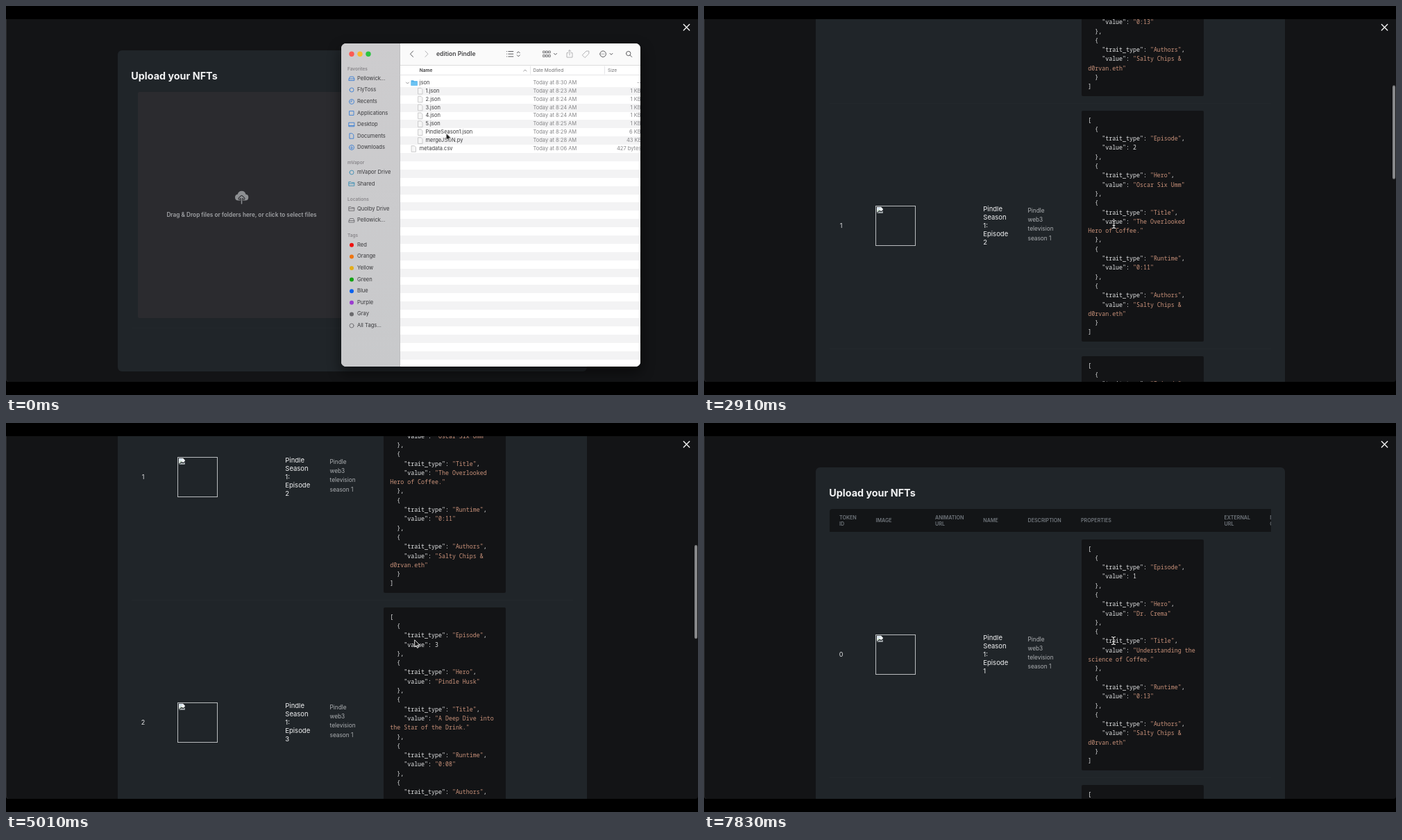
Write an HTML page that moves like this. It is 997 by 561 pixels and loops after 8 s.

```html
<!DOCTYPE html>
<html lang="en">
<head>
<meta charset="utf-8">
<title>Upload your NFTs</title>
<style>
@property --s { syntax: "<number>"; inherits: true; initial-value: 0; }
html, body { margin: 0; width: 100%; height: 100%; overflow: hidden; background: #000; }
#stage { position: relative; width: 997px; height: 561px; overflow: hidden; background: #000;
  font-family: Inter, Roboto, sans-serif; animation: scroll 8s linear infinite; }
#stage div, #stage svg { position: absolute; box-sizing: border-box; }
svg { left: 0; top: 0; overflow: visible; fill: none; stroke-linecap: round; stroke-linejoin: round; }
.t { white-space: pre; line-height: 12px; }

#view { left: 0; top: 19px; width: 997px; height: 523px; overflow: hidden; background: #131416;
  border-radius: 0 0 4px 4px; box-shadow: inset 1px 0 #2a2b2d; }
.layer { left: 0; top: 0; width: 997px; height: 561px; }
#page { top: -19px; transform: translateY(calc(var(--s) * -1px)); }
.panel { left: 160.5px; width: 676px; top: 64px; background: #202529; border-radius: 6px; }
#drop { animation: drop 8s step-end infinite; }
#table { animation: table 8s step-end infinite; }
#bar { left: 991.5px; top: 0; width: 4.5px; height: 135px; border-radius: 3px; background: #88898b;
  transform: translateY(calc(var(--s) * .2575px)); animation: bar 8s linear infinite; }
.title { font-size: 14.35px; font-weight: 700; color: #f2f3f4; }
.line { left: 181px; width: 636px; height: 1px; background: #23282c; }
.zone { left: 190px; top: 124px; width: 299px; height: 326px; background: #2b2b2f; border-radius: 2px; }
.hint { left: 190px; width: 299px; text-align: center; font-size: 8.25px; font-weight: 600; color: #a0a2a5; }
.head { left: 180.5px; top: 124px; width: 636px; height: 32.5px; border-radius: 4px 0 0 0; background: #131517; overflow: hidden; }
.th { font-size: 7.15px; font-weight: 600; line-height: 9.6px; color: #70767c; }
.id { width: 30px; text-align: center; font-size: 9px; color: #e6e7e8; }
.name { font-size: 9.5px; line-height: 11.86px; color: #f0f1f2; }
.desc { font-size: 8.3px; line-height: 13.3px; color: #adb0b3; }
.img { left: 247.3px; width: 57.5px; height: 57.5px; border: 1px solid #b9bcbe; }
.code { left: 544px; width: 176px; height: 333px; padding: 7px 9.3px; background: #131416; border-radius: 2px;
  font: 500 8.3px/13.3px "Noto Sans Mono", "DejaVu Sans Mono", monospace; white-space: pre; color: #e2e3e4; }
.code i { font-style: normal; color: #ca927a; }
.btn { top: 1950.5px; height: 24px; border-radius: 3.5px; background: #2f3337; text-align: center;
  font-size: 9.4px; font-weight: 600; line-height: 24px; color: #f4f5f6; }
.pg { font-size: 8.7px; color: #d8dadb; }

#finder { left: 483px; top: 54px; width: 431px; height: 466px; border-radius: 7px; overflow: hidden; background: #fff; }
#win { left: 0; top: 0; width: 997px; height: 561px; animation: win 8s step-end infinite; }
#shade { left: 483px; top: 54px; width: 431px; height: 466px; border-radius: 7px; box-shadow: 0 8px 18px 2px rgba(0,0,0,.45); }
#fin { left: -483px; top: -54px; width: 997px; height: 561px; }
.side { left: 483px; top: 54px; width: 85px; height: 466px; background: linear-gradient(#cdccce, #c8c9cb); border-right: 1px solid #bdbdbf; }
.tool { left: 568px; top: 54px; width: 346px; height: 31.5px; background: #fafafa; border-bottom: 1px solid #dcdcdc; }
.rows { left: 568px; top: 104.8px; width: 346px; height: 416px;
  background: repeating-linear-gradient(#fff 0 11.9px, #f3f3f4 11.9px 23.8px); }
.wt { font-size: 8.65px; font-weight: 600; color: #454547; }
.col { font-size: 6.6px; color: #707072; }
.colb { font-size: 6.6px; font-weight: 600; color: #3a3a3c; }
.grp { font-size: 6.5px; font-weight: 600; color: #88868a; }
.item { font-size: 7.6px; color: #39393c; }
.file { font-size: 7.5px; color: #3b3b3d; }
.meta { font-size: 7.5px; color: #858587; }
.sel { left: 572px; top: 176.6px; width: 350px; height: 11.4px; border-radius: 3px; background: #0a5fd6; }
.pick { left: 0; top: 0; animation: pick 8s step-end infinite; }
.pick .t { color: #fff; }

#cur { left: 0; top: 0; animation: move 8s linear infinite; }
#ghost { left: 0; top: 0; animation: ghost 8s step-end infinite; }
#ghost .t { color: #d9dadb; }
#arrow { animation: arrow 8s step-end infinite; }
#beam { animation: beam 8s step-end infinite; }

/* Two flicks of the wheel, each with a brief hold between push and glide */
@keyframes scroll {
  0% { --s: 0 }
  33% { --s: 0; animation-timing-function: cubic-bezier(.4,.1,.7,.4) }
  36.35% { --s: 371 }
  36.65% { --s: 371; animation-timing-function: cubic-bezier(.3,.42,.6,1) }
  43.5% { --s: 1508 }
  60.45% { --s: 1508; animation-timing-function: cubic-bezier(.4,.2,.7,.7) }
  62.6% { --s: 610 }
  62.9% { --s: 610; animation-timing-function: cubic-bezier(.2,.46,.5,1) }
  65.9%, 100% { --s: 0 }
}
@keyframes bar {
  0%, 32.9%, 48%, 60.4%, 70.1%, 100% { opacity: 0 }
  33.1%, 45%, 60.6%, 67% { opacity: 1 }
}
@keyframes drop { 0% { opacity: 1 } 16.5%, 100% { opacity: 0 } }
@keyframes table { 0% { opacity: 0 } 16.5%, 100% { opacity: 1 } }
@keyframes win { 0% { opacity: 1 } 17.625%, 100% { opacity: 0 } }
@keyframes pick { 0% { opacity: 0 } 6.375%, 100% { opacity: 1 } }
@keyframes ghost { 0% { opacity: 0 } 6.375% { opacity: .7 } 16.125%, 100% { opacity: 0 } }
@keyframes arrow { 0% { opacity: 1 } 19.5% { opacity: 0 } 47.25% { opacity: 1 } 71.6%, 100% { opacity: 0 } }
@keyframes beam { 0% { opacity: 0 } 19.5% { opacity: 1 } 47.25% { opacity: 0 } 71.6%, 100% { opacity: 1 } }
@keyframes move {
  0% { transform: translate(635.5px, 184.5px) }
  6.375% { transform: translate(635.5px, 184.5px); animation-timing-function: cubic-bezier(.45,0,.4,1) }
  16.125% { transform: translate(345px, 330px) }
  16.5% { transform: translate(345px, 330px); animation-timing-function: ease-in-out }
  19.5%, 47.2% { transform: translate(590.5px, 315px) }
  47.25%, 100% { transform: translate(590px, 314px) }
}
</style>
</head>
<body>
<div id="stage">
  <div id="view">
    <div class="layer" id="page">
      <div class="layer" id="drop"></div>
      <div class="layer" id="table"></div>
    </div>
    <div id="bar"></div>
  </div>
  <svg width="997" height="561" stroke="#f4f4f4" stroke-width="1.4"><path d="M976.3 26.5l8.4 8.4m0-8.4l-8.4 8.4"/></svg>
  <div id="win"><div id="shade"></div><div id="finder"><div id="fin"></div></div></div>
  <div id="cur">
    <div id="ghost"></div>
    <svg id="arrow" width="1" height="1"><path d="M-1.3-.8V9l2.3-2.1 1.5 3.5 1.7-.7L2.7 6.3h3.1z" fill="#111" stroke="#fff" stroke-width=".9"/></svg>
    <svg id="beam" width="1" height="1"></svg>
  </div>
</div>
<script>
const $ = id => document.getElementById(id);
const put = (id, html) => $(id).insertAdjacentHTML('beforeend', html);
// Text whose first line is centred on y
const text = (x, y, s, cls, lh = 12) =>
  `<div class="t ${cls}" style="left:${x}px;top:${y - lh / 2}px">${s}</div>`;
const svg = body => `<svg width="997" height="561">${body}</svg>`;
const path = (d, attr = '') => `<path d="${d}" ${attr}/>`;
const stroke = (d, color, w = 1) => path(d, `stroke="${color}" stroke-width="${w}"`);
const title = text(180.3, 101, 'Upload your NFTs', 'title');
const panel = h => `<div class="panel" style="height:${h}px"></div>`;

const beam = 'M-2.5-5.5q2 0 2.5 1.2q.5-1.2 2.5-1.2M0-4.3V4.3M-2.5 5.5q2 0 2.5-1.2q.5 1.2 2.5 1.2M-1.3 1.5h2.6';
$('beam').innerHTML = stroke(beam, '#111', 2.2) + stroke(beam, '#fff', 1.1);

// Drop view
const up = 'M339.5 285v-10.5m-3.3 3.3l3.3-3.3 3.3 3.3';
put('drop', panel(463) + title + '<div class="zone"></div><div class="line" style="top:464px"></div>' +
  '<div class="t hint" style="top:294.5px">Drag &amp; Drop files or folders here, or click to select files</div>' +
  svg(path('M335 280.5q-5 0-5-4.6q0-3.7 3.7-4.4q1.2-4.7 6-4.7q4.7 0 5.7 4.7q3.9.4 3.9 4.4q0 4.6-5 4.6z', 'fill="#8d8f92"') +
    stroke(up, '#2b2b2f', 3.4) + stroke(up, '#8d8f92', 1.5)));

// Table view
const show = 'Pindle';
const traits = [
  ['Dr. Crema', 'Understanding the\nscience of Coffee.', '0:13'],
  ['Oscar Six Umm', 'The Overlooked\nHero of Coffee.', '0:11'],
  ['Pindle Husk', 'A Deep Dive into\nthe Star of the Drink.', '0:08'],
  ['Milton', 'A Closer Look at\nthe Daily Roast.', '0:09'],
  ['Conrad', 'Best Equipment\nfor Your Latte.', '0:05']
];
const str = s => `<i>"${s}"</i>`;
const trait = (key, val) => `  {\n    "trait_type": ${str(key)},\n    "value": ${val}\n  }`;
const code = ([hero, name, time], i) => '[\n' + [
  trait('Episode', i + 1),
  trait('Hero', str(hero)),
  trait('Title', str(name)),
  trait('Runtime', str(time)),
  trait('Authors', str('Salty Chips &amp;\nd0rvan.eth'))
].join(',\n') + '\n]';

const broken = path('M1 .8h6l2.8 2.8v1.4l-2.600 2-2-1.200-4.200 3z'.replace(/00\b/g, ''), 'fill="#f1f4f5"') +
  path('M1.8 1.8h4l.5 1.5-4.500.8z'.replace(/00\b/g, ''), 'fill="#cfe0ef"') +
  path('M1.8 6.2l2.2-1.8 1.2 1-3.400 2z'.replace(/00\b/g, ''), 'fill="#a9c6a8"') +
  path('M1 9.800l4-2.600 2.200 1 2.600-1.700v3.300z'.replace(/00\b/g, ''), 'fill="#aeb5b8"');

const row = (r, i) => {
  const y = 156.5 + 354.1 * i, mid = y + 177;
  return `<div class="code" style="top:${y + 11}px">${code(r, i)}</div>` +
    `<div class="t id" style="left:182.5px;top:${mid - 6}px">${i}</div>` +
    `<div class="img" style="top:${mid - 28.5}px"><svg width="11" height="11">${broken}</svg></div>` +
    text(402.3, mid - 23.5, `${show}\nSeason\n1:\nEpisode\n${i + 1}`, 'name', 11.86) +
    text(466.5, mid - 21.3, `${show}\nweb3\ntelevision\nseason 1`, 'desc', 13.3) +
    `<div class="line" style="top:${y + (i < 4 ? 354 : 371)}px"></div>`;
};

const heads = [[195, 'TOKEN\nID'], [247.5, 'IMAGE'], [333, 'ANIMATION\nURL'], [402.3, 'NAME'],
  [466.5, 'DESCRIPTION'], [543, 'PROPERTIES'], [749.5, 'EXTERNAL\nURL'], [815.3, 'B\nC']];
const btn = (x, w, label = '', bg = '') =>
  `<div class="btn" style="left:${x}px;width:${w}px;${bg && 'background:' + bg}">${label}</div>`;

put('table', panel(1940) + title + '<div class="head">' + heads.map(([x, s]) =>
    text(x - 180.5, s.includes('\n') ? 12.3 : 17, s, 'th', 9.6)).join('') + '</div>' +
  traits.map(row).join('') +
  [199, 227.8, 304, 332.5].map(x => btn(x, 24)).join('') + btn(361, 48) +
  btn(707, 45.5, 'Reset', '#515458') + btn(757, 41, 'Next', '#2f82fa') +
  text(256, 1962.5, 'Page <b>1</b> of <b>1</b>', 'pg') + text(371, 1962.5, '50', 'name') +
  svg(stroke('M208.5 1960v5m4.5-5l-2.3 2.5 2.3 2.5M241 1960l-2.3 2.5 2.3 2.5M314.8 1960l2.3 2.5-2.3 2.5M342.3 1960l2.3 2.5-2.3 2.5m4.5-5v5', '#777b80') +
    stroke('M394.3 1961.5l2.2 2.2 2.2-2.2', '#d8dadb')));

// File window
const items = [[90.5, 'Favorites'], [104.5, 'Pellowick...', 'disk'], [121, 'FlyToss', 'dot'], [138, 'Recents', 'clock'],
  [154.5, 'Applications', 'box'], [171, 'Desktop', 'desk'], [187.5, 'Documents', 'page'], [204, 'Downloads', 'down'],
  [226, 'mVapor'], [240, 'mVapor Drive', 'dot'], [256.5, 'Shared', 'folder'],
  [278.5, 'Locations'], [292.5, 'Quolby Drive', 'folder'], [309, 'Pellowick...', 'disk'], [331, 'Tags']];
const ring = 'M-3.5 0a3.5 3.5 0 1 0 7 0a3.5 3.5 0 1 0-7 0';
const icons = {
  disk: 'M-3.8.5l1.3-3h5l1.3 3v2.5h-7.6zM-3.8.5h7.6',
  dot: 'M-3 0a3 3 0 1 0 6 0a3 3 0 1 0-6 0',
  clock: ring + 'M0-2v2h-1.5',
  box: 'M-3-3h6v6h-6z',
  desk: 'M-3.8-2.8h7.6v5.6h-7.6zM-3.8 1.5h7.6',
  page: 'M-2.7-3.7h3.5l2 2v5.4h-5.5z',
  down: ring + 'M0-1.7v3.4m-1.4-1.4l1.4 1.4 1.4-1.4',
  folder: 'M-3.8-2.8h2.8l1 1h3.8v4.6h-7.6zM-3.8-.4h7.6'
};
const tags = [['Red', '#f00f0f'], ['Orange', '#ee7410'], ['Yellow', '#e3ad1c'], ['Green', '#12a312'],
  ['Blue', '#0a62ee'], ['Purple', '#9b3cd0'], ['Gray', '#6a6a6d'], ['All Tags...', '']];
const tagY = i => 344.8 + 16.6 * i;
const files = [['json', '8:30', '--', 909], ['1.json', '8:23', '1 KB', 899.5], ['2.json', '8:24', '1 KB', 899.5],
  ['3.json', '8:24', '1 KB', 899.5], ['4.json', '8:24', '1 KB', 899.5], ['5.json', '8:25', '1 KB', 899.5],
  [show + 'Season1.json', '8:29', '6 KB', 898], ['mergeJSON.py', '8:28', '43 KB', 894], ['metadata.csv', '8:06', '427 bytes', 880]];

const sheet = (x, y) => path(`M${x - 3} ${y - 4.3}h4l2 2v6.6h-6z`, 'fill="#f6f6f6" stroke="#b9b9bb" stroke-width=".7"');
const fileRow = ([name, time, size, sx], i) => {
  const y = 110.8 + 11.9 * i, outer = i === 0 || i === 8;
  return text(outer ? 595.8 : 604.5, y, name, 'file') + text(759.5, y, `Today at ${time} AM`, 'meta') +
    text(sx, y, size, 'meta') + (i ? svg(sheet(outer ? 587.5 : 597, y)) : '');
};

const cells = [774, 778, 782].map(x => `M${x} 65h2.3v2.8h-2.3zm0 5.5h2.3v2.8h-2.3z`).join('');
const lines = [65.5, 69.2, 72.9].map(y => `M721.5 ${y}h.1m2.2 0h7`).join('');
const tools =
  stroke('M586.5 65l-4 4.2 4 4.2' + lines + 'M736.3 67.8l2-2 2 2m-4 3l2 2 2-2M789.5 68.3l2 2 2-2M870 68.3l2 2 2-2' +
    'M855.8 69.2a4.3 4.3 0 1 0 8.6 0a4.3 4.3 0 1 0-8.6 0M858.2 69.2h.1m1.7 0h.1m1.7 0h.1' +
    'M893.5 68.5a3.2 3.2 0 1 0 6.4 0a3.2 3.2 0 1 0-6.4 0M899.2 71l2.5 2.5', '#5c5c5f') +
  stroke(cells, '#5c5c5f', .8) +
  stroke('M604 65l4 4.2-4 4.2M810 67.5h-2v6.5h8v-6.5h-2M812 71v-7.5m-2 2l2-2 2 2M830.5 70.5l5.5-5.5h3.8v3.8l-5.5 5.5z', '#b4b4b6');
const tint = y => y < 210 ? '#3d7fd4' : y < 270 ? '#3f8fb4' : '#6f6e72';

put('fin', '<div class="side"></div><div class="tool"></div><div class="rows"></div>' +
  svg(['#fb5b53', '#f8bc30', '#2bc440'].map((c, i) =>
    `<circle cx="${498 + 12 * i}" cy="69.3" r="3.7" fill="${c}"/>`).join('') + tools +
    stroke('M755.5 87v11M862.5 87v11M568 99.5h346', '#e0e0e2', .8) +
    stroke('M745.8 94l2-2 2 2M576.5 110l2 2 2-2', '#8a8a8c', .9) +
    path('M583.5 107.3h3.5l1 1h4.8v6.5h-9.3z', 'fill="#4fb0ea"') +
    path('M583.5 109.5h9.3v5.3h-9.3z', 'fill="#6cc3f3"') +
    items.filter(it => it[2]).map(([y, , k]) =>
      `<g transform="translate(498 ${y})">${stroke(icons[k], tint(y), .9)}</g>`).join('') +
    tags.map(([, c], i) =>
      `<circle cx="498" cy="${tagY(i)}" r="3" ${c ? `fill="${c}"` : 'stroke="#6f6e72" stroke-width=".9"'}/>`).join('')) +
  text(620, 69.3, 'edition ' + show, 'wt') +
  text(595.8, 92.7, 'Name', 'colb') + text(759.5, 92.7, 'Date Modified', 'col') + text(867, 92.7, 'Size', 'col') +
  items.map(([y, s, k]) => k ? text(506, y, s, 'item') : text(492, y, s, 'grp')).join('') +
  tags.map(([s], i) => text(506, tagY(i), s, 'item')).join('') +
  files.map(fileRow).join('') +
  `<div class="pick"><div class="sel"></div>${fileRow(files[6], 6)}</div>`);

put('ghost', svg(sheet(-38.5, -2)) + text(-31, -2, show + 'Season1.json', 'file'));
</script>
</body>
</html>
```
